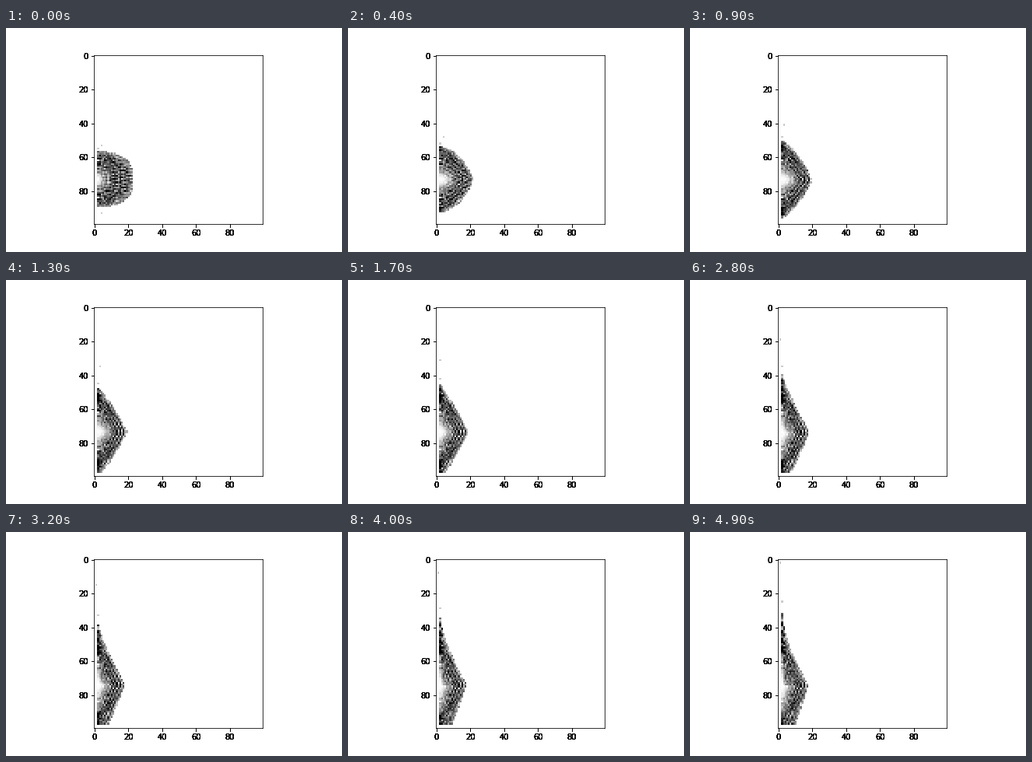
A matplotlib script that plays this animation: 432 by 288 pixels, repeating every 5000 ms.

```python
import numpy as np
import matplotlib.pyplot as plt
from matplotlib.animation import FuncAnimation

SIZE, FRAMES, INTERVAL = 100, 50, 100
WALL, FLOOR = 2, 97
OVERPRINTS = 9

rows, cols = np.mgrid[:SIZE, :SIZE]
noise = np.random.default_rng(4).normal(0, 1, (SIZE, SIZE))


def plume_top(t):
    return 57 - 0.72 * t + 0.0044 * t ** 2


def plume(t):
    # A blunt bow at first, which sharpens into a tall, pointed wedge.
    centre = 73.2 + 0.02 * t
    half = centre - plume_top(t) + 0.4
    nose = 15 + 5.4 * np.exp(-t / 13)
    bluntness = 1 + 2 * np.exp(-t / 2.5)
    taper = 0.5 + 0.022 * t
    taper = np.where(rows > centre, min(taper, 0.85), taper)

    x = np.maximum(cols - WALL, 0) / (nose + 0.4)
    dy = np.abs(rows - centre)
    level = x ** (1 / taper) + (dy / half) ** bluntness
    inside = (level < 1) & (cols >= WALL) & (rows <= FLOOR)
    depth = np.minimum(level, 1) ** (1 / bluntness)

    # Level stripes turn into chevrons, strongest towards the nose.
    age = min(t / 12, 1)
    slope, pitch = 1 - 0.55 * age, 0.2 + 0.7 * age
    stripes = np.cos(np.pi * (dy * slope + (cols - WALL) * pitch))
    stripes *= 0.12 + 0.6 * np.clip(x, 0, 1) * np.exp(-dy / 7)
    rings = 0.15 * np.cos(16 * np.pi * depth)
    grain = 0.24 * noise[np.abs(rows - 73), cols]

    tone = np.interp(depth, [0, 0.12, 0.3, 0.6, 0.85, 1],
                     [0, 0.06, 0.42, 0.66, 0.62, 0.36])
    wall = 0.2 * ((cols <= WALL + 1) & (depth > 0.45))
    value = (tone + wall) * (1 + stripes + rings + grain)
    return np.where(inside, np.clip(value, 0, 1), 0)


def field(t):
    value = plume(t)
    # Faint cells run up ahead of the plume, mirrored below while there is room.
    lead = round(53.4 - 1.5 * t + 0.0094 * t ** 2)
    col = max(1, 4 - t // 8)
    value[lead, col] = 0.2
    if 146 - lead <= FLOOR:
        value[146 - lead, col] = 0.2
    value[round(plume_top(t) - 2 - t / 10), WALL] = 0.2
    return value


plt.rcParams.update({"font.family": "DejaVu Sans", "font.size": 10,
                     "text.kerning_factor": 6})
fig = plt.figure(figsize=(6, 4), dpi=72, facecolor="white")
fig.subplots_adjust(left=0.125, right=0.9, bottom=0.1252, top=0.88)


def add_axes(name, **options):
    ax = fig.add_subplot(111, label=name, aspect="equal",
                         xlim=(-0.5, 99.5), ylim=(99.5, -0.5), **options)
    ax.set_xticks(range(0, SIZE, 20))
    ax.set_yticks(range(0, SIZE, 20))
    return ax


main = add_axes("main")
image = main.imshow(field(0), cmap="gray_r", vmin=0, vmax=1,
                    interpolation="nearest")
# Overprinted labels give the heavy, hard-edged digits.
for n in range(OVERPRINTS):
    add_axes(f"overprint{n}", frameon=False)


def update(i):
    image.set_data(field(i))
    return [image]


anim = FuncAnimation(fig, update, frames=FRAMES, interval=INTERVAL,
                     repeat=True, repeat_delay=0, blit=False)
plt.show()
```
